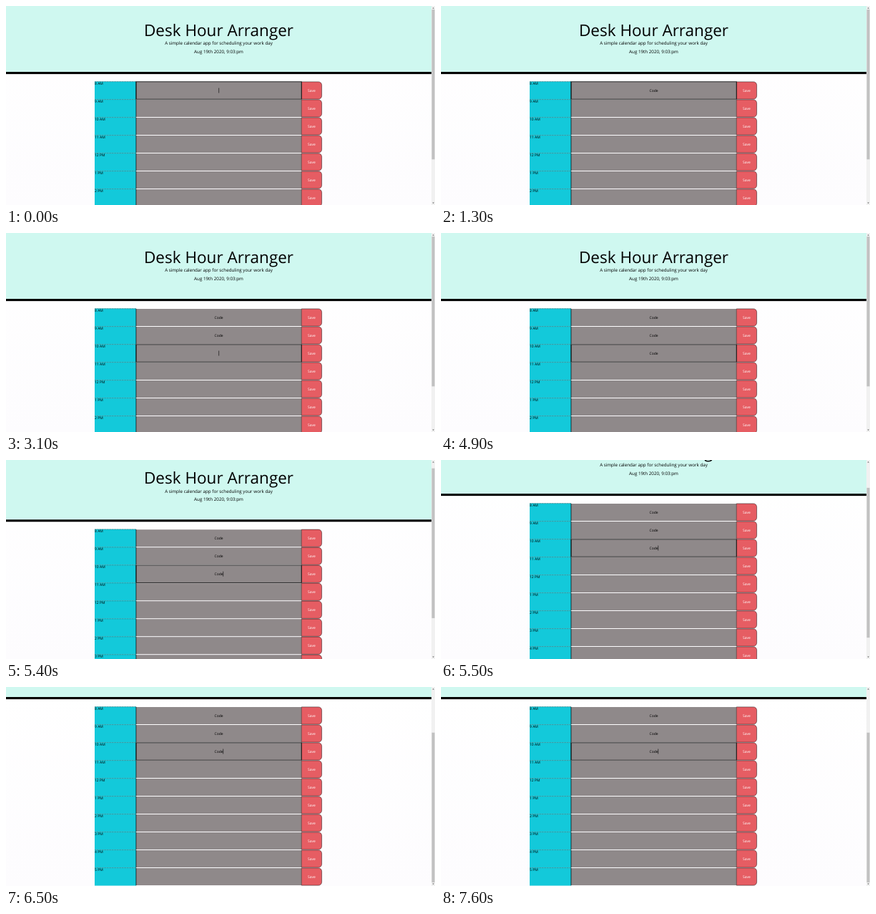
These frames come from a looping animation (600x278 px, 8 s). An HTML page with a canvas:

```html
<!DOCTYPE html>
<html lang="en">
<head>
<meta charset="utf-8">
<title>Planner</title>
<style>
  html, body { margin: 0; width: 100%; height: 100%; overflow: hidden; background: #fff; }
  canvas { display: block; }
</style>
</head>
<body>
<canvas id="stage" width="600" height="278"></canvas>
<script>
const ctx = document.getElementById('stage').getContext('2d');
const LOOP = 8000, WIDTH = 600, HEIGHT = 278, PAGE_HEIGHT = 356;
const PAGE_WIDTH = 595, CENTER = PAGE_WIDTH / 2;
const ROW_TOP = 105.5, ROW_HEIGHT = 25;
const HOUR_X = 124, FIELD_X = 182, SAVE_X = 413.3, SAVE_END = 441.6;
const HOURS = ['8 AM', '9 AM', '10 AM', '11 AM', '12 PM', '1 PM', '2 PM', '3 PM', '4 PM', '5 PM'];
const WORD = 'Code';

// Per row: time of focus, then the time of each key press
const TYPING = [
  { focus: 0, keys: [300, 400, 600, 800] },
  { focus: 1400, keys: [1900, 2100, 2400, 2500] },
  { focus: 3100, keys: [3700, 3900, 4200, 4400] }
];
const CARET_OFF = [[1300, 1400], [4900, 5400], [6000, 6500], [7000, 7600]];
const SCROLL = [[5600, 78], [5500, 45], [5400, 8.8], [0, 0]];

function rect(x, y, w, h, color) {
  ctx.fillStyle = color;
  ctx.fillRect(x, y, w, h);
}

function text(str, x, y, size, color = '#000', align = 'center') {
  ctx.font = `${size}px "Open Sans", sans-serif`;
  ctx.textAlign = align;
  ctx.fillStyle = color;
  ctx.fillText(str, x, y);
}

function drawHeader() {
  rect(0, 0, PAGE_WIDTH, 92, '#cff8f0');
  rect(0, 92, PAGE_WIDTH, 3.1, '#000');
  text('Desk Hour Arranger', CENTER, 42.2, 22.5);
  text('A simple calendar app for scheduling your work day', CENTER, 54.4, 6.25);
  text('Aug 19th 2020, 9:03:pm', CENTER, 66, 6.25);
}

function drawRow(hour, i) {
  const y = ROW_TOP + i * ROW_HEIGHT;
  rect(HOUR_X, y, FIELD_X - HOUR_X, ROW_HEIGHT, '#13c9da');
  ctx.strokeStyle = 'rgba(0, 0, 0, .75)';
  ctx.lineWidth = 0.5;
  ctx.setLineDash([0.9, 0.5]);
  ctx.beginPath();
  ctx.moveTo(HOUR_X, y + 0.1);
  ctx.lineTo(FIELD_X, y + 0.1);
  ctx.stroke();
  ctx.setLineDash([]);
  text(hour, HOUR_X, y + 4.7, 5, '#000', 'left');

  rect(FIELD_X, y + 0.5, SAVE_X - FIELD_X, ROW_HEIGHT - 1, '#8f898a');
  rect(FIELD_X - 0.4, y + 0.3, 0.7, ROW_HEIGHT - 0.6, '#000');

  ctx.beginPath();
  ctx.roundRect(SAVE_X, y + 0.4, SAVE_END - SAVE_X, ROW_HEIGHT - 0.8, [0, 4.7, 4.7, 0]);
  ctx.fillStyle = '#e65d63';
  ctx.fill();
  ctx.strokeStyle = 'rgba(25, 10, 12, .85)';
  ctx.lineWidth = 0.6;
  ctx.stroke();
  text('Save', 427.4, y + 14.4, 5, '#fff');
}

function drawEntries(t) {
  const active = TYPING.findLastIndex(row => t >= row.focus);
  TYPING.forEach(({ keys }, i) => {
    const typed = WORD.slice(0, keys.filter(k => t >= k).length);
    const y = ROW_TOP + i * ROW_HEIGHT;
    text(typed, CENTER, y + 14.3, 5);
    if (i !== active) return;
    ctx.strokeStyle = '#111';
    ctx.lineWidth = 0.9;
    ctx.strokeRect(FIELD_X, y + 0.3, SAVE_X - FIELD_X, ROW_HEIGHT - 0.6);
    if (!CARET_OFF.some(([from, to]) => t >= from && t < to)) {
      rect(CENTER + ctx.measureText(typed).width / 2, y + 9, 0.6, 7, '#000');
    }
  });
}

function arrow(y, dir) {
  ctx.fillStyle = '#555';
  ctx.beginPath();
  ctx.moveTo(596.4, y + dir * 0.7);
  ctx.lineTo(598.8, y + dir * 0.7);
  ctx.lineTo(597.6, y - dir * 0.7);
  ctx.fill();
}

function drawScrollbar(scroll) {
  const ratio = (HEIGHT - 10) / PAGE_HEIGHT;
  rect(PAGE_WIDTH, 0, 5, HEIGHT, '#f1f1f1');
  rect(PAGE_WIDTH + 0.5, 5 + scroll * ratio, 4, HEIGHT * ratio, '#c1c1c1');
  arrow(2.7, 1);
  arrow(HEIGHT - 2.7, -1);
}

function draw(t) {
  const scroll = SCROLL.find(([start]) => t >= start)[1];
  const paper = ctx.createLinearGradient(0, 0, 0, HEIGHT);
  paper.addColorStop(0, '#fff');
  paper.addColorStop(1, '#fdfcfe');
  rect(0, 0, WIDTH, HEIGHT, paper);
  ctx.save();
  ctx.translate(0, -scroll);
  drawHeader();
  HOURS.forEach(drawRow);
  drawEntries(t);
  ctx.restore();
  drawScrollbar(scroll);
}

ctx.textRendering = 'geometricPrecision';
const start = performance.now();
function tick() {
  draw((performance.now() - start) % LOOP);
  requestAnimationFrame(tick);
}
tick();
</script>
</body>
</html>
```
